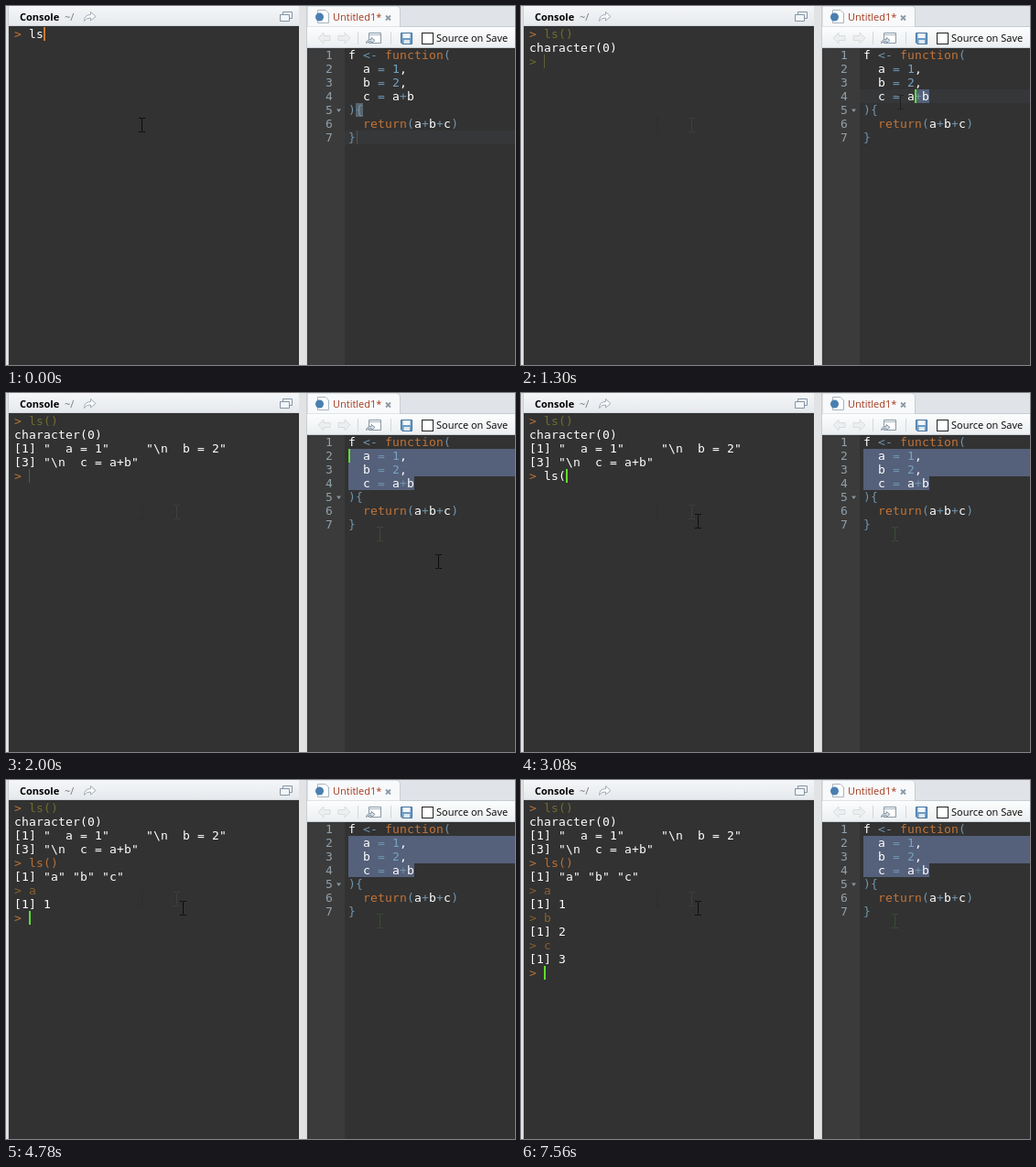
An HTML page for the animation above (8 s loop, 556 by 392 pixels).

```html
<!DOCTYPE html>
<html lang="en">
<head>
<meta charset="utf-8">
<title>Console and editor</title>
<style>
  html, body { margin: 0; width: 100%; height: 100%; overflow: hidden; background: #323232; }
  svg { display: block; width: 556px; height: 392px; }
  text { white-space: pre; }
  .ui { font: 11px "Open Sans", "Noto Sans", sans-serif; }
  .mono { font: 13px "DejaVu Sans Mono", monospace; letter-spacing: calc(8px - .602em); fill: #fff; }
  .key { fill: #c47436; }
  .op { fill: #7095ae; }
  .num { fill: #76a2c2; }
  .line { fill: #92a0aa; }
  .prompt { fill: #b8733a; }
  .run { fill: #b86f35; }
  .dim { fill: #87602f; }
  .olive { fill: #6f6c2f; }
  .sel { fill: #55607a; }
</style>
</head>
<body>
<svg id="stage" viewBox="0 0 556 392">
  <defs>
    <linearGradient id="head" x2="0" y2="1">
      <stop offset="0" stop-color="#f4f6f8"/><stop offset="1" stop-color="#e6e9ec"/>
    </linearGradient>
    <linearGradient id="bar" x2="0" y2="1">
      <stop offset="0" stop-color="#fcfdfd"/><stop offset="1" stop-color="#eceff1"/>
    </linearGradient>
    <path id="beam" d="M-3.5 -7.5H-1Q0 -7.5 0 -6.5Q0 -7.5 1 -7.5H3.5M0 -6.5V6.5M-3.5 7.5H-1Q0 7.5 0 6.5Q0 7.5 1 7.5H3.5" fill="none"/>
    <path id="arrow" d="M0 6L6 0V3.5H13V8.5H6V12Z" fill="#eceef0" stroke="#d9dde0"/>
  </defs>

  <rect width="556" height="392" fill="#e2e3e4"/>
  <path d="M2.500 0V392M328.500 0V392" stroke="#cbced1"/>
  <!-- console pane -->
  <rect x="3" width="317" height="392" fill="#323232"/>
  <rect x="3" width="317" height="22" fill="url(#head)"/>
  <path d="M3 21.500H320" stroke="#cfd5da"/>
  <g class="ui">
    <text x="15" y="16" font-weight="700">Console</text>
    <text x="64" y="16" fill="#777">~/</text>
  </g>
  <path d="M85.500 16.500Q85.500 9.500 92.500 9.500V6.500L98 11.500L92.500 16V13Q88 12.500 85.500 16.500Z" fill="#f8fafb" stroke="#a3adb6"/>
  <g fill="#f3f6f8" stroke="#8495a6">
    <path d="M302.500 6.500H312.500V13.500H302.500Z"/><path d="M299.500 9.500H309.500V16.500H299.500Z"/>
  </g>

  <!-- editor pane -->
  <rect x="329" width="227" height="23" fill="#e0e4e8"/>
  <path d="M329 23V0H426Q430.500 0 430.500 5V23Z" fill="#f8f9fa" stroke="#c6cdd3"/>
  <path d="M431 22.500H556" stroke="#c6cdd3"/>
  <rect x="329" y="23" width="227" height="22" fill="url(#bar)"/>
  <path d="M329 45.500H556" stroke="#c8ced3"/>
  <path d="M340.500 4.500H349L352.500 8V18.500H340.500Z" fill="#fff" stroke="#a9b4be"/>
  <circle cx="342.500" cy="12" r="4.500" fill="#4a7fb0"/>
  <g class="ui">
    <text x="357" y="16" fill="#a33b20">Untitled1*</text>
    <text x="470" y="39">Source on Save</text>
  </g>
  <path d="M415 10.500L420 15.500M420 10.500L415 15.500" stroke="#8b99a5" stroke-width="1.800"/>
  <use href="#arrow" x="341" y="29"/>
  <use href="#arrow" transform="matrix(-1 0 0 1 376 29)"/>
  <path d="M384.500 28V42M420.500 28V42" stroke="#d3d8dc"/>
  <g transform="translate(-1 0)">
    <path d="M397.500 29.500H410.500V40.500H397.500Z" fill="#fff" stroke="#8797a5"/>
    <path d="M398 31.500H410" stroke="#a8b5c0"/>
    <path d="M394.500 40.500Q395 36.500 400 36.500V34.500L404 37.500L400 40.500V38.500Q397 38.500 394.500 40.500Z" fill="#dbe4eb" stroke="#8392a0"/>
  </g>
  <path d="M431.500 29.500H443.500V41.500H433L431.500 40Z" fill="#6b9bc5" stroke="#44739f"/>
  <path d="M433.500 30H441.500V35H433.500Z" fill="#f4f8fb"/>
  <path d="M434.500 37H441V41H434.500Z" fill="#dfe8ef"/>
  <rect x="454.500" y="29.500" width="12" height="12" fill="#fff" stroke="#222"/>
  <rect x="329" y="46" width="227" height="346" fill="#323232"/>
  <rect x="329" y="46" width="41" height="346" fill="#3b3b3b"/>
  <path d="M361 112.500H366L363.500 116Z" fill="#8795a0"/>

  <g id="marks"></g>
  <g id="code" class="mono"></g>
  <g id="console" class="mono"></g>
  <g id="carets"></g>
</svg>
<script>
const LOOP = 8000, CH = 8, ROW = 15;
const CON = { x: 9, y: 23 }, ED = { x: 374, y: 46 };
const $ = id => document.getElementById(id);
const esc = s => s.replace(/&/g, "&amp;").replace(/</g, "&lt;");
const label = (x, y, s, cls = "") => `<text x="${x}" y="${y}" class="${cls}">${s}</text>`;
const box = (x, y, w, h, attr) => `<rect x="${x}" y="${y}" width="${w}" height="${h}" ${attr}/>`;
const at = (steps, t) => steps.filter(s => s[0] <= t).pop();

const code = ["f <- function(", "  a = 1,", "  b = 2,", "  c = a+b", "){", "  return(a+b+c)", "}"];
const paint = s => s.split(/(function|return|<-|[=+(){}]|\d)/).map(w => {
  const cls = /^(function|return)$/.test(w) ? "key"
    : /^(<-|[=+(){}])$/.test(w) ? "op" : /^\d$/.test(w) ? "num" : "";
  return cls ? `<tspan class="${cls}">${esc(w)}</tspan>` : esc(w);
}).join("");
$("code").innerHTML = code.map((s, i) => {
  const y = ED.y + 12 + i * ROW;
  return label(349, y, i + 1, "line") + label(ED.x, y, paint(s));
}).join("");

// Console rows: [row, [time, text, class, prompt class], ...]
const rows = [
  [0, [0, "ls", "", "key"], [460, "ls(", "", "key"], [530, "ls()", "", "key"],
    [680, "ls()", "run", "key"], [750, "ls()", "olive", "prompt"]],
  [1, [750, "character(0)"]],
  [2, [750, "", "", "prompt"], [1300, "", "", "olive"], [2000, '[1] "  a = 1"     "\\n  b = 2"']],
  [3, [2000, '[3] "\\n  c = a+b"']],
  [4, [2000, "", "", "prompt"], [2610, "l", "", "prompt"], [2680, "ls", "", "prompt"],
    [3080, "ls(", "", "prompt"], [3150, "ls()", "", "prompt"], [3380, "ls()", "run", "prompt"]],
  [5, [3380, '[1] "a" "b" "c"']]
];
// Each lookup: [first row, variable, value, shown, typed, entered, printed]
[[6, "a", 1, 3380, 4390, 4720, 4780],
 [8, "b", 2, 4780, 5480, 5780, 5860],
 [10, "c", 3, 5860, 6880, 7480, 7560]].forEach(([r, name, value, shown, typed, entered, printed]) => rows.push(
  [r, [shown, "", "", "prompt"], [typed, name, "", "prompt"],
    [entered, name, "key", "prompt"], [printed, name, "dim", "dim"]],
  [r + 1, [printed, "[1] " + value]]));
rows.push([12, [7560, "", "", "prompt"]]);

const GREEN = "#5fdc2c", ORANGE = "#cc7833";
// [time, column, row, colour]; no column means hidden
const caret = [
  [0, 4, 0, ORANGE], [460, 5, 0, GREEN], [600, 6, 0, GREEN], [680, 0, 1, GREEN],
  [750, 2, 2, GREEN], [1300, 2, 2, "#5f5f38"], [2000, 2, 4, "#4f6040"],
  [2610, 3, 4, GREEN], [2680, 4, 4, GREEN], [3080, 5, 4, GREEN], [3230, 6, 4, GREEN],
  [3380, 2, 6, GREEN], [4010], [4390, 3, 6, GREEN], [4720, 0, 7, GREEN],
  [4780, 2, 8, GREEN], [5410], [5480, 3, 8, GREEN], [5780, 0, 9, GREEN],
  [5860, 2, 10, GREEN], [6480], [6880, 3, 10, GREEN], [7480, 0, 11, GREEN], [7560, 2, 12, GREEN]
];
// [time, x, y, colour]
const mouse = [
  [0, 148, 130, "#0c0c0c"], [1300, 414, 105, "#202020"], [1380, 378, 70, "#202020"],
  [2000, 472, 184, "#0c0c0c"], [2610, 193, 140, "#0c0c0c"]
];
const traces = [[1300, 148, 130, "#2e2e2e"], [1300, 186, 130, "#3f403c"], [2000, 408, 154, "#3c4b39"]];

const beam = ([, x, y, color]) => `<use href="#beam" x="${x + .5}" y="${y}" stroke="${color}"/>`;

function drawMarks(t) {
  const sel = (col, row, w) => box(ED.x + col * CH, ED.y + row * ROW, w, ROW, 'class="sel"');
  const active = row => box(370, ED.y + row * ROW, 186, ROW, 'fill="#363739"');
  if (t < 1300) return active(6) + box(ED.x + CH, ED.y + 4 * ROW, CH, ROW, 'fill="#59656d"');
  if (t < 1380) return active(3) + sel(7, 3, 2 * CH);
  return sel(0, 1, 182) + sel(0, 2, 182) + sel(0, 3, 9 * CH);
}

function drawConsole(t) {
  return rows.map(([r, ...steps]) => {
    const s = at(steps, t);
    if (!s) return "";
    const [, text, cls, prompt] = s, y = CON.y + 12 + r * ROW;
    return prompt
      ? label(CON.x, y, "&gt;", prompt) + label(CON.x + 2 * CH, y, esc(text), cls)
      : label(CON.x, y, esc(text));
  }).join("");
}

function drawCarets(t) {
  const [, col, row, color] = at(caret, t);
  let out = traces.filter(s => s[0] <= t).map(beam).join("");
  if (col !== undefined) {
    const w = color === GREEN || color === ORANGE ? 2 : 1;
    out += box(CON.x + col * CH, CON.y + row * ROW, w, ROW, `fill="${color}"`);
  }
  if (t < 1300) out += box(383, ED.y + 6 * ROW, 1, ROW, 'fill="#5a5148"');
  else if (t < 1380) out += box(430, ED.y + 3 * ROW, 2, ROW, `fill="${GREEN}"`);
  else if (t < 2610) out += box(ED.x, ED.y + ROW, 2, ROW, `fill="${GREEN}"`);
  return out + beam(at(mouse, t));
}

const layers = { marks: drawMarks, console: drawConsole, carets: drawCarets };
const shown = {};
function frame() {
  const t = performance.now() % LOOP;
  for (const id in layers) {
    const html = layers[id](t);
    if (html !== shown[id]) $(id).innerHTML = shown[id] = html;
  }
  requestAnimationFrame(frame);
}
frame();
</script>
</body>
</html>
```
